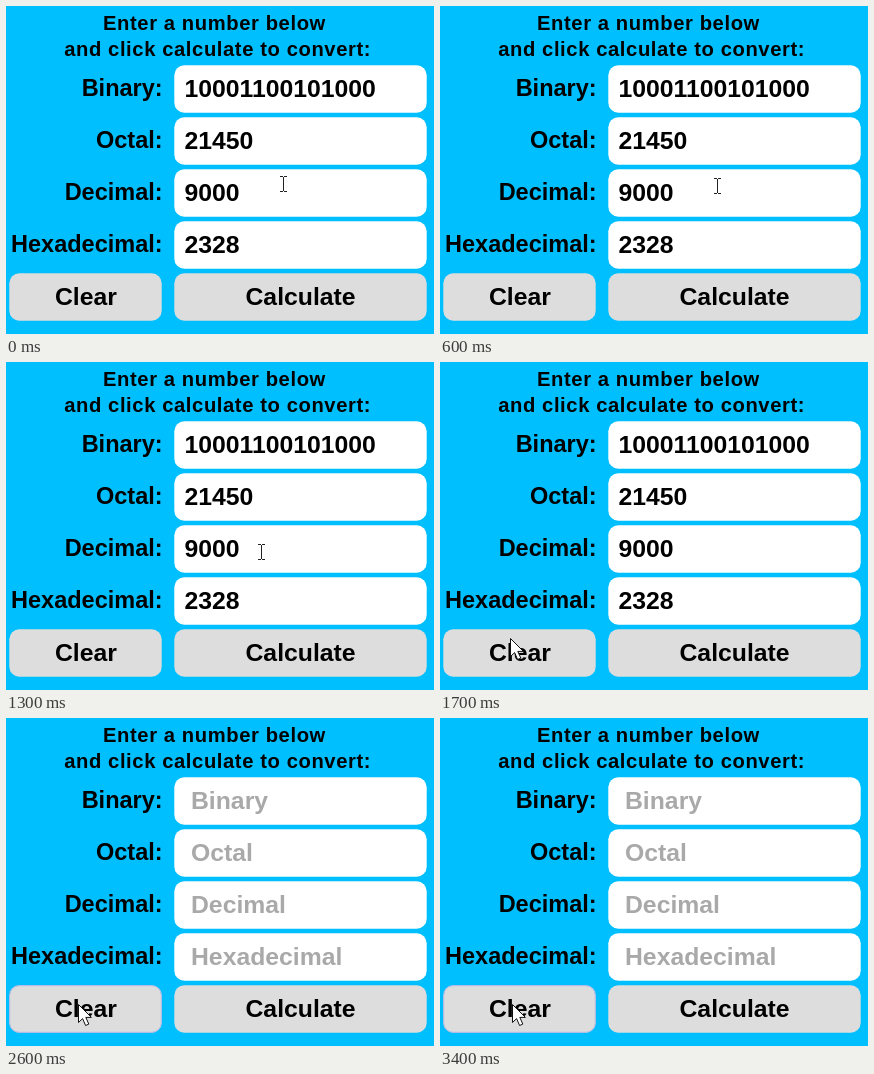
Animation, 428 px wide and 328 px high, one loop 3500 ms. Source, as an HTML page:

```html
<!DOCTYPE html>
<html lang="en">
<head>
<meta charset="utf-8">
<title>Number converter</title>
<style>
  html, body { margin: 0; width: 100%; height: 100%; overflow: hidden; background: #00bfff; }
  svg { display: block; }
  text { font: bold 24.75px "Liberation Sans", Arial, sans-serif; white-space: pre; }
  .head { font-size: 20.2px; letter-spacing: .6px; }
  .label { font-size: 23.5px; text-anchor: end; }
  .hint { fill: #a9a9a9; }
  .field { fill: #fff; }
  .button { fill: #ddd; }
</style>
</head>
<body>
<svg id="stage" width="428" height="328" viewBox="0 0 428 328">
  <text class="head" x="97" y="24">Enter a number below</text>
  <text class="head" x="58.2" y="50">and click calculate to convert:</text>
  <g id="form"></g>
  <g id="values"></g>
  <g id="hints"></g>
  <rect id="focus" x="3.7" y="267.7" width="151.6" height="46.6" rx="9.5" fill="none" stroke="#b4b8e8"/>
  <text x="49" y="299">Clear</text>
  <text x="239.5" y="299">Calculate</text>
  <path id="beam" d="M-3 -7.5H0M1 -7.5H4M.5 -7V7M-3 7.5H0M1 7.5H4" fill="none" stroke="#222"/>
  <path id="arrow" d="M.5 .5V18.5L4.6 14.6L7.6 21.5L10.8 20.1L7.8 13.4H13.4Z" fill="#fff" stroke="#111"/>
</svg>
<script>
const LOOP = 3500, STEP = 100, CLEARED = 2600;
const rows = [["Binary", "10001100101000"], ["Octal", "21450"], ["Decimal", "9000"], ["Hexadecimal", "2328"]];
// Pointer path: time, x, y
const path = [[0, 277, 178], [300, 277, 179], [900, 277, 180], [1200, 277, 180],
  [1700, 70, 276], [2300, 70, 287], [2600, 72, 286], [LOOP, 72, 286]];
const $ = id => document.getElementById(id);

// Slightly inset, for soft edges
function box(kind, x, y, width) {
  const inset = .3;
  return `<rect class="${kind}" x="${x + inset}" y="${y + inset}"
    width="${width - 2 * inset}" height="${48 - 2 * inset}" rx="10"/>`;
}

rows.forEach(([name, value], i) => {
  const y = 59 + 52 * i, base = y + 32;
  $("form").innerHTML += box("field", 168, y, 253) +
    `<text class="label" x="156.6" y="${base - 1}">${name}:</text>`;
  $("values").innerHTML += `<text x="178.5" y="${base}">${value}</text>`;
  $("hints").innerHTML += `<text class="hint" x="185" y="${base}">${name}</text>`;
});
$("form").innerHTML += box("button", 3, 267, 153) + box("button", 168, 267, 253);

function pointerAt(t) {
  const i = path.findIndex(p => p[0] > t);
  const [t0, x0, y0] = path[i - 1], [t1, x1, y1] = path[i];
  const u = (t - t0) / (t1 - t0), k = u * u * (3 - 2 * u);
  return [Math.round(x0 + (x1 - x0) * k), Math.round(y0 + (y1 - y0) * k)];
}

function show(id, on) {
  $(id).style.display = on ? "" : "none";
}

function draw(now) {
  const t = Math.floor(now % LOOP / STEP) * STEP;
  const [x, y] = pointerAt(t), inField = x > 168, cleared = t >= CLEARED;
  for (const id of ["beam", "arrow"]) $(id).setAttribute("transform", `translate(${x} ${y})`);
  show("beam", inField);
  show("arrow", !inField);
  show("values", !cleared);
  show("hints", cleared);
  show("focus", cleared);
}

const start = performance.now();
function tick() {
  draw(performance.now() - start);
  requestAnimationFrame(tick);
}
tick();
</script>
</body>
</html>
```
